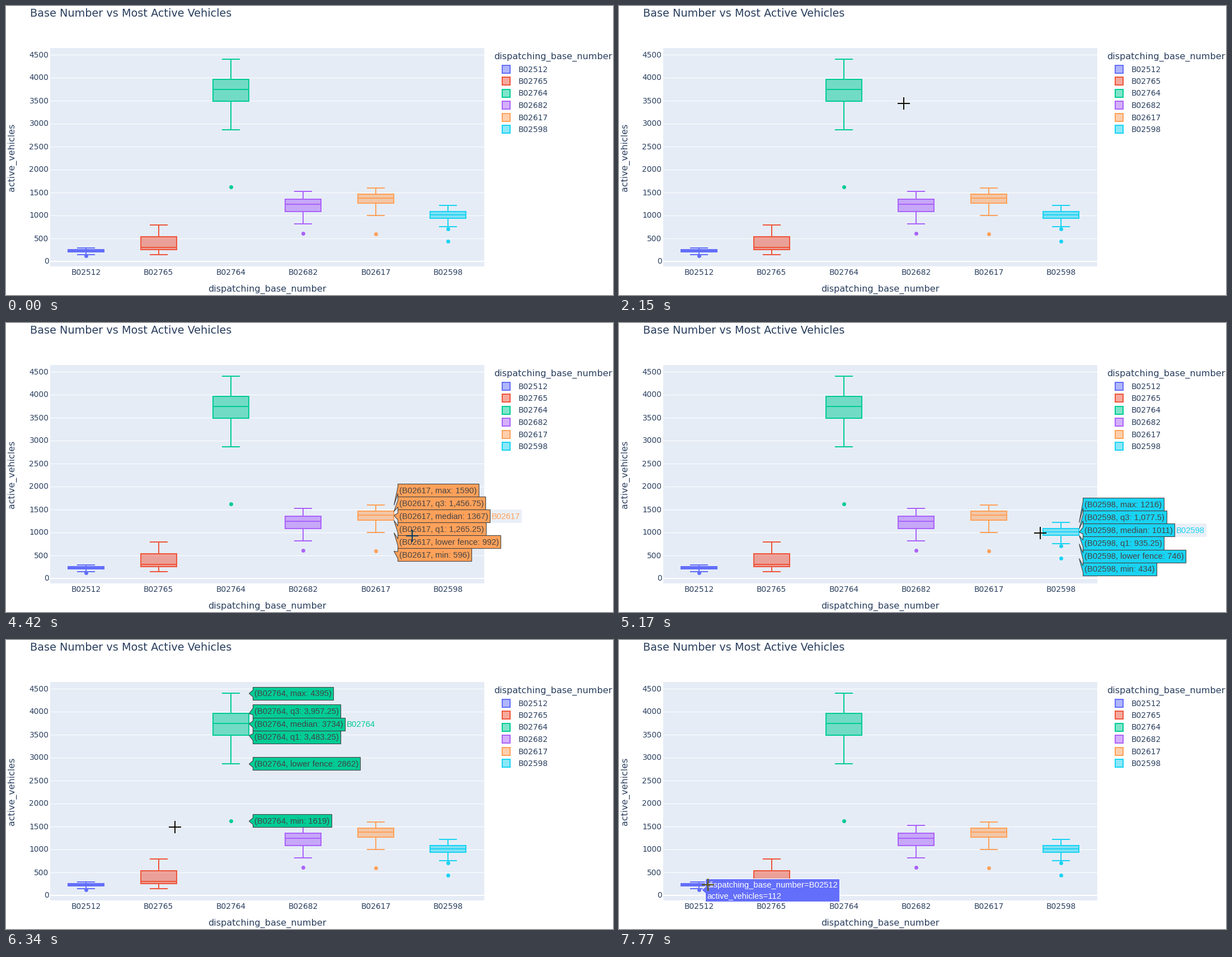
Recreate the animation shown at these times as a matplotlib script. Size 1085 px wide and 516 px high, loop 8 s.

```python
import numpy as np
import matplotlib.pyplot as plt
from matplotlib.animation import FuncAnimation
from matplotlib.colors import to_rgb
from matplotlib.patches import Polygon, Rectangle

W, H, DPI = 1085, 516, 100
LOOP, STEP = 8000, 40
PX = 72 / DPI
INK, PAPER = "#2a3f5f", "#e5ecf6"
LEFT, RIGHT, TOP, BOTTOM = 78.5, 855, 75, 465
COLUMN = (RIGHT - LEFT) / 6
HALF_BOX, HALF_CAP = 32, 16
ARROW, ROW, HOVER_SIZE = 6.8, 23.1, 14.8
REACH, LAG = 42, 70  # hover distance in px, hover delay in ms

# name, colour, (max, q3, median, q1, lower fence), outliers
BASES = [
    ("B02512", "#636efa", (281, 245, 222, 200, 146), (112,)),
    ("B02765", "#ef553b", (786, 530.75, 296, 245.75, 135), ()),
    ("B02764", "#00cc96", (4395, 3957.25, 3734, 3483.25, 2862), (1619,)),
    ("B02682", "#ab63fa", (1523, 1342.5, 1235, 1085.25, 811), (600,)),
    ("B02617", "#ffa15a", (1590, 1456.75, 1367, 1265.25, 992), (596,)),
    ("B02598", "#19d3f3", (1216, 1077.5, 1011, 935.25, 746), (705, 434)),
]

# Pointer path: each stroke starts where the last one ended
STROKES = [
    [(1050, 460, -20), (1550, 416, 139)],
    [(1940, 416, 139), (2140, 509, 174), (2500, 634, 291), (2640, 657, 355)],
    [(3200, 657, 355), (3470, 630, 351), (3540, 582, 346), (3800, 547, 352)],
    [(3930, 547, 352), (4350, 665, 350), (4420, 726, 380), (4630, 753, 375)],
    [(5500, 753, 375), (6200, 425, 291), (6340, 302, 334), (6830, 273, 412)],
    [(7350, 273, 412), (7770, 159, 437)],
]
TIMES, XS, YS = np.array(sum(STROKES, [])).T

fig = plt.figure(figsize=(W / DPI, H / DPI), dpi=DPI, facecolor="white")
ax = fig.add_axes([0, 0, 1, 1])
ax.set_xlim(0, W)
ax.set_ylim(H, 0)
ax.axis("off")


def y_of(value):
    return 455.5 - 0.082 * value


def x_of(i):
    return LEFT + COLUMN * (i + 0.5)


def line(xs, ys, color, width, z=2):
    return ax.plot(xs, ys, color=color, lw=width * PX, zorder=z,
                   solid_capstyle="butt")[0]


def label(x, y, text, size, color=INK, font="DejaVu Sans", **kw):
    kw.setdefault("va", "baseline")
    return ax.text(x, y, text, fontsize=size * PX, color=color,
                   fontfamily=font, **kw)


def rect(x0, y0, x1, y1, face, edge="none", width=0, z=1):
    return ax.add_patch(Rectangle((x0, y0), x1 - x0, y1 - y0, fc=face, ec=edge,
                                  lw=width * PX, zorder=z))


def draw_axes():
    rect(LEFT, TOP, RIGHT, BOTTOM, PAPER, z=0)
    for value in range(0, 4501, 500):
        y = y_of(value)
        line([LEFT, RIGHT], [y, y], "white", 1 if value else 2, 1)
        label(76.5, y + 5, str(value), 13.8, ha="right")
    label(43.2, 19, "Base Number vs Most Active Vehicles", 19.3)
    label(467, 510, "dispatching_base_number", 16.1, ha="center")
    label(10.5, 270, "active_vehicles", 15.9, rotation=90, ha="center", va="center")
    label(872.5, 95, "dispatching_base_number", 16.1)


def draw_box(i, name, color, stats, outliers):
    x = x_of(i)
    high, q3, median, q1, low = map(y_of, stats)
    fill = (*to_rgb(color), 0.5)
    rect(x - HALF_BOX, q3, x + HALF_BOX, q1, fill, color, 2, 2)
    line([x - HALF_BOX, x + HALF_BOX], [median, median], color, 2, 3)
    for end, side in ((high, q3), (low, q1)):
        line([x, x], [side, end], color, 2)
        line([x - HALF_CAP, x + HALF_CAP], [end, end], color, 2)
    for value in outliers:
        ax.plot(x, y_of(value), "o", ms=7 * PX, mew=0, color=color, zorder=3)
    label(x, 480, name, 13.8, ha="center")

    y = 112.5 + 21.5 * i
    rect(886.5, y - 7, 900.5, y + 7, fill, color, 2)
    label(915.5, y + 5, name, 13.8)


def spread(ys, gap):
    """Push label centres at least one gap apart, keeping each group's mean."""
    blocks = []
    for k, y in enumerate(ys):
        blocks.append([y - k * gap, 1])
        while len(blocks) > 1 and blocks[-2][0] > blocks[-1][0]:
            m, n = blocks.pop()
            p, q = blocks[-1]
            blocks[-1] = [(m * n + p * q) / (n + q), n + q]
    flat = [m for m, n in blocks for _ in range(n)]
    return [f + k * gap for k, f in enumerate(flat)]


def number(value):
    return f"{value:,}" if value % 1 else str(value)


class Hover:
    """Callouts of one base, shown while the pointer touches its box."""

    def __init__(self, i, name, color, stats, outliers):
        self.color = color
        self.artists = []
        self.areas = []
        self.x = x_of(i)
        values = [*stats, *outliers[-1:]]
        self.top, self.bottom = y_of(values[0]), y_of(values[-1])
        if i == 0:
            self.add_point(name, values[-1])
        else:
            self.add_stats(name, values)

    def add_point(self, name, value):
        lines = ["dispatching_base_number=" + name, f"active_vehicles={value}"]
        y = y_of(value)
        self.callout((self.x + 4, y), y, lines, 41, "white")

    def add_stats(self, name, values):
        keys = ["max", "q3", "median", "q1", "lower fence", "min"]
        if len(values) < len(keys):
            keys.remove("lower fence")
        ys = [y_of(v) for v in values]
        for key, value, y, center in zip(keys, values, ys, spread(ys, ROW)):
            text = f"({name}, {key}: {number(value)})"
            end = self.callout((self.x + HALF_BOX, y), center, [text], ROW, "#444444")
            if key == "median":
                self.name_tag(end, center, name)

    def callout(self, tip, center, lines, height, ink):
        x0 = tip[0] + ARROW
        z = 10 + 0.1 * len(self.areas)
        first = center + 5.2 - 9.5 * (len(lines) - 1)
        texts = [label(x0 + 2.9, first + 19 * k, s, HOVER_SIZE, ink,
                       "Liberation Sans", zorder=z + 0.05)
                 for k, s in enumerate(lines)]
        x1 = x0 + 6.5 + max(t.get_window_extent().width for t in texts)
        top, bottom = center - height / 2, center + height / 2
        shape = Polygon([tip, (x0, center - 6), (x0, top), (x1, top), (x1, bottom),
                         (x0, bottom), (x0, center + 6)], fc=self.color, ec=ink,
                        lw=1.1 * PX, zorder=z, snap=True)
        ax.add_patch(shape)
        self.artists += [shape, *texts]
        self.areas.append((x0, x1, top, bottom))
        return x1

    def name_tag(self, x, center, name):
        back = rect(x, center - 12, x + 57, center + 12, (*to_rgb(PAPER), 0.8), z=9)
        text = label(x + 2.5, center + 5.2, name, HOVER_SIZE, self.color,
                     "Liberation Sans", zorder=9.5)
        self.artists += [back, text]

    def touched(self, x, y):
        return abs(x - self.x) <= REACH and self.top <= y <= self.bottom

    def covers(self, x, y):
        return any(a <= x <= b and c <= y <= d for a, b, c, d in self.areas)

    def show(self, on):
        for artist in self.artists:
            artist.set_visible(on)


draw_axes()
for i, base in enumerate(BASES):
    draw_box(i, *base)
hovers = [Hover(i, *base) for i, base in enumerate(BASES)]
pointer = [line([0, 0], [0, 0], "black", 2, 20) for _ in range(2)]


def pointer_at(t):
    return np.interp(t, TIMES, XS), np.interp(t, TIMES, YS)


def update(frame):
    t = frame * STEP + STEP / 2
    x, y = pointer_at(t)
    under = PAPER
    for hover in hovers:
        on = hover.touched(*pointer_at(t - LAG))
        hover.show(on)
        if on and hover.covers(x, y):
            under = hover.color

    # The pointer darkly inverts what lies below it
    color = tuple(0.6 * (1 - np.array(to_rgb(under))))
    pointer[0].set_data([x - 11, x + 11], [y, y])
    pointer[1].set_data([x, x], [y - 11, y + 11])
    for arm in pointer:
        arm.set_color(color)
    return pointer


anim = FuncAnimation(fig, update, frames=LOOP // STEP, interval=STEP,
                     repeat=True, repeat_delay=0, blit=False)
plt.show()
```
